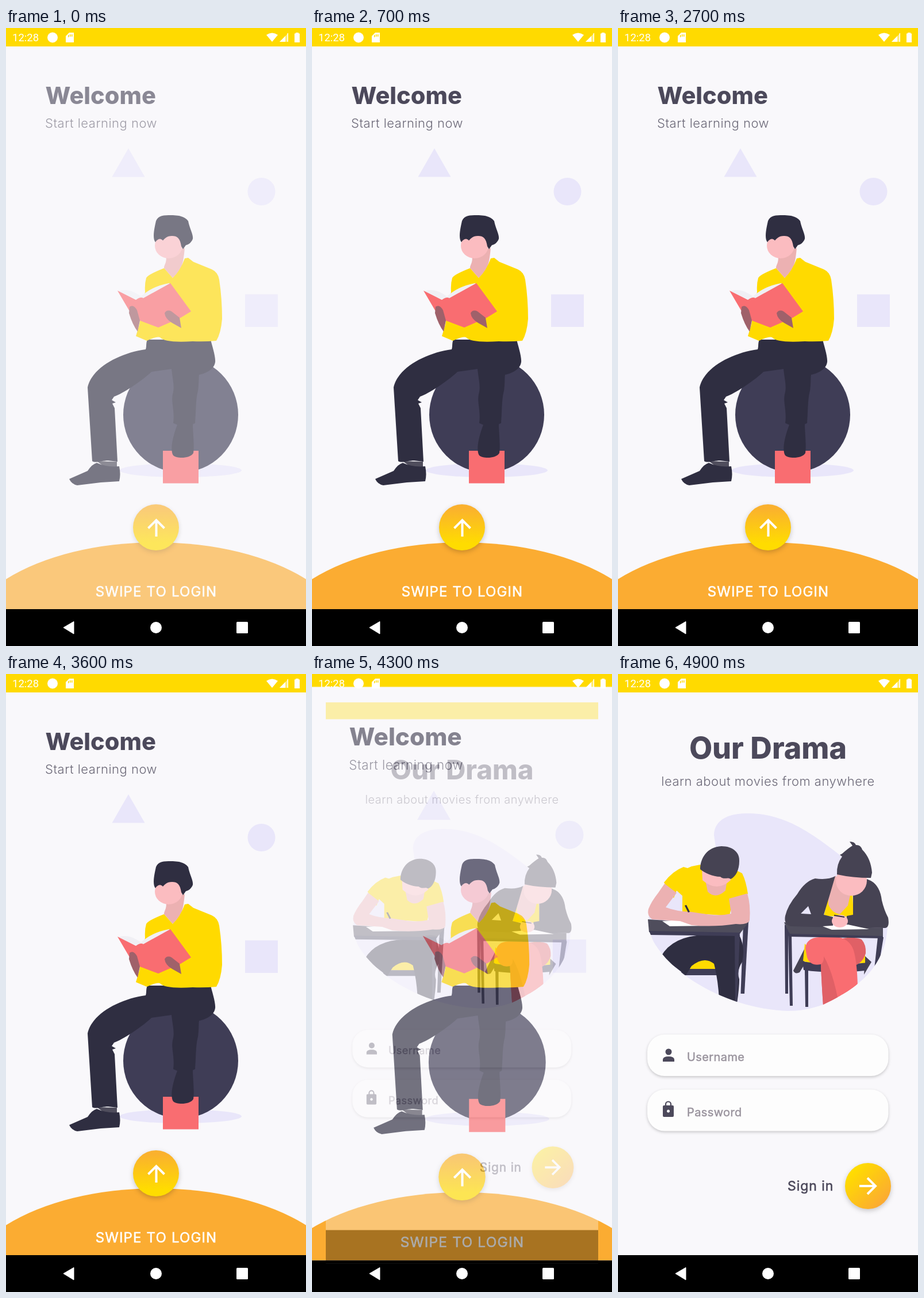
An HTML page that plays this animation: 522 by 1073 pixels, repeating every 5 s.

```html
<!DOCTYPE html>
<html lang="en">
<head>
<meta charset="utf-8">
<title>Welcome to login</title>
<style>
  html, body { margin: 0; width: 100%; height: 100%; overflow: hidden; background: #000; }
  svg { display: block; width: 522px; height: 1073px; font-family: Inter, "Open Sans", sans-serif; }

  .yellow { fill: #ffda00; }
  .lilac { fill: #e9e6fa; }
  .dark { fill: #2f2e41; }
  .navy { fill: #3f3d56; }
  .coat { fill: #464353; }
  .slate { fill: #4f4d5c; }
  .red { fill: #f96d71; }
  .deep { fill: #e06066; }
  .face { fill: #fbbcc0; }
  .skin { fill: #ecb1b2; }
  .brown { fill: #9f616a; }
  .white { fill: #fff; }
  .page { fill: #f9f8fb; }
  .arrow { fill: none; stroke: #fff; stroke-width: 4; }
  .raised { filter: drop-shadow(0 3px 4px #0003); }
  .card { fill: #fdfdfd; filter: drop-shadow(0 2px 2.5px #0003); }

  .ink { fill: #4c495b; }
  .h1 { font-weight: 800; font-size: 41.5px; }
  .h2 { font-weight: 800; font-size: 52px; }
  .sub { font-weight: 300; font-size: 22px; letter-spacing: .5px; fill: #6c6978; }
  .swipe { font-size: 24px; letter-spacing: 1.15px; stroke: #fff; stroke-width: .6px; }
  .hint { font-size: 20px; letter-spacing: .4px; fill: #9a949e; stroke: #9a949e; stroke-width: .5px; }
  .sign { font-size: 23px; letter-spacing: .95px; stroke: #4c495b; stroke-width: .6px; }
  .clock { font: 18.5px Roboto, sans-serif; }

  /* The screen updates ten times a second, so every pose is held. */
  .fade, .welcome, .login, .scrim { animation: 5s step-end infinite; transform-origin: 261px 536.5px; }
  .fade { animation-name: fade; }
  .welcome { animation-name: exit; }
  .login { animation-name: enter; }
  .scrim { animation-name: dim; }
  @keyframes fade {
    0% { opacity: .64; }
    2% { opacity: .88; }
    4%, 100% { opacity: 1; }
  }
  @keyframes exit {
    0% { transform: scale(1); }
    86% { transform: scale(1.019); }
    88% { transform: scale(1.045); }
    90%, 100% { transform: scale(1.05); }
  }
  @keyframes enter {
    0% { transform: scale(.85); opacity: 0; }
    86% { transform: scale(.908); opacity: .33; }
    88% { transform: scale(.985); opacity: 1; }
    90% { transform: scale(.9976); opacity: 1; }
    92%, 100% { transform: scale(1); opacity: 1; }
  }
  @keyframes dim {
    0% { opacity: 0; }
    88%, 100% { opacity: .25; }
  }
</style>
</head>
<body>
<svg viewBox="0 0 522 1073">
  <defs>
    <linearGradient id="up" x1="0" y1="0" x2="0" y2="1">
      <stop offset=".08" stop-color="#fab12e"/><stop offset=".85" stop-color="#ffdc00"/>
    </linearGradient>
    <linearGradient id="next" x1="0" y1="0" x2="1" y2="1">
      <stop offset=".18" stop-color="#ffdc00"/><stop offset=".88" stop-color="#fba835"/>
    </linearGradient>
    <path id="blob" d="M167 280C167 255 190 241 228 242C290 242 340 278 388 316C410 340 460 420 469 440C465 500 430 540 357 574C335 582 315 585 295 585C200 582 100 530 62 465C50 440 48 410 70 385C100 355 172 340 170 300Z"/>
    <clipPath id="inBlob"><use href="#blob"/></clipPath>
    <g id="window">
      <path class="page" d="M0 0h522v1073H0z"/>
      <path class="yellow" d="M0 0h522v32H0z"/>
      <path d="M0 1009h522v64H0z"/>
    </g>
  </defs>

  <g class="welcome">
    <use href="#window"/>
    <g class="fade">
      <text class="ink h1" x="68.500" y="132">Welcome</text>
      <text class="sub" x="68" y="173">Start learning now</text>

      <g class="lilac">
        <path d="M213 209L241.500 258.500H184.500Z"/>
        <circle cx="444.500" cy="284" r="24"/>
        <path d="M416 462.500h57v56.500h-57z"/>
        <ellipse cx="304" cy="768" rx="106" ry="12"/>
      </g>
      <circle class="navy" cx="304" cy="671.500" r="100"/>
      <path class="red" d="M273 734h62v56.500h-62z"/>
      <path class="slate" d="M158 752L193 753V764L170 761Z"/>
      <path class="dark" d="M246 541C243 548 245 553 243 558C198 564 149 590 142 624L150 752C156 756 166 751 178 751L194 753L189 660L185 652L191 650L184 646L188 640C205 634 240 610 253 597L288 592C290 612 294 622 290 636C287 650 294 665 291 686L298 689C288 715 286 735 291 742C297 748 320 748 326 738C328 724 325 700 325 688L329 686C331 660 330 645 334 630C336 616 335 605 336 602C346 600 362 594 364 580C365 570 358 550 356 541Z"/>
      <path class="dark" d="M110 783L142 769Q150 757 158 755Q175 763 197 761Q200 775 197 787L165 789L124 794Q114 792 110 783Z"/>
      <path class="skin" d="M278 392C281 408 275 410 275 417L290 434Q301 424 306 412Q309 404 311 382Z"/>
      <path class="yellow" d="M275 417Q247 428 244 434Q241 444 242 458L232 515L226 535L245 543Q262 535 268 537Q276 547 325 544Q345 545 366 543Q374 530 376 505Q376 470 371 437Q369 424 358 419L326 406L317 399L311 400Q303 422 290 434Z"/>
      <ellipse class="face" cx="283" cy="378" rx="24" ry="22"/>
      <path class="dark" d="M260 372C255 366 257 352 261 335C265 325 275 325 287 325C305 325 312 329 317 335C320 350 326 358 325 366C323 372 318 376 313 377L308 384L305 379C303 365 298 361 289 361C279 361 276 366 273 369C268 363 262 368 260 372Z"/>
      <path fill="#f0eff4" d="M195 457C210 452 222 457 235 466Q255 448 284 443L287 447L235 474L197 460Z"/>
      <path class="red" d="M194 456L226 472Q234 466 239 469L286 443L322 492L304 503L265 520L233 508L214 490Z"/>
      <path class="brown" d="M215 484Q222 479 228 490L233 508L229 527Q220 515 214 495Z"/>
      <path class="brown" d="M276 495Q280 488 288 492L302 503L305 521L289 512Q277 505 276 495Z"/>

      <path fill="#fbac32" d="M0 957A340 178 0 0 1 522 957V1009H0Z"/>
      <text class="white swipe" x="261.500" y="986.500" text-anchor="middle">SWIPE TO LOGIN</text>
      <circle class="raised" cx="261" cy="867" r="40" fill="url(#up)"/>
      <path class="arrow" d="M261.500 883V856M247.500 868.500L261.500 854.500L275.500 868.500"/>
    </g>
  </g>
  <path class="scrim" d="M0 0h522v1073H0z"/>

  <g class="login">
    <use href="#window"/>
    <text class="ink h2" x="261" y="147" text-anchor="middle">Our Drama</text>
    <text class="sub" x="261" y="194" text-anchor="middle">learn about movies from anywhere</text>
    <use class="lilac" href="#blob"/>

    <!-- legs and furniture -->
    <g clip-path="url(#inBlob)">
      <path class="navy" d="M218 434L227 431L220 555H213.500Z"/>
      <path class="yellow" d="M122 512Q145 488 172 498V513Z"/>
      <path class="navy" d="M110 512h64v11h-64z"/>
      <path class="dark" d="M75 490Q95 455 150 453H211Q222 475 216 500Q206 515 211 530Q211 545 207 572L176 565Q174 530 167 503Q150 489 128 507L118 523Z"/>
      <path class="navy" d="M203 452h9L207 572h-3Z"/>

      <path class="navy" d="M290 436h6v119h-5ZM296 450h6L304 576h-5ZM325 512h6v66h-5ZM452 457h10L450 530h-6Z"/>
      <path class="coat" d="M327 472Q318 490 305 515Q308 522 316 518L324 505ZM430 490L441 500L428 522Z"/>
      <path class="yellow" d="M325 468L322 498Q335 504 352 500ZM398 456h14v10h-14zM426 485h4v17h-14z"/>
      <path class="navy" d="M321 499Q375 508 436 501L430 515Q370 521 323 514Z"/>
      <path class="deep" d="M385 460Q410 455 424 461Q432 470 431 485Q425 504 408 507Z"/>
      <path class="deep" d="M398 485Q414 497 416 545L390 560Z"/>
      <path class="red" d="M326 476Q328 458 350 457L385 457Q404 462 410 480Q416 500 417 542L357 576Q354 530 353 504Q335 508 329 492Z"/>
      <path class="deep" d="M358 490Q373 515 383 566L357 576Q354 535 353 504Q359 500 358 490Z"/>
    </g>

    <!-- left student -->
    <path class="slate" d="M52 426L180 434L228 430L212 451L54 448Z"/>
    <path class="navy" d="M54 446L213 449L210 455L57 453Z"/>
    <path class="white" d="M77 429L110 427L162 437L90 438Z"/>
    <path class="yellow" d="M114 335L121 337L128 334L143 331L152 345Q180 365 208 342L216 346Q223 360 226 382L200 390L194 420L112 414V385L102 376L97 389L80 362Q95 342 114 335Z"/>
    <path class="skin" d="M81 364L102 380L83 405Q100 412 127 413L160 418Q180 420 197 416L193 390L225 381Q231 400 229 428Q225 436 205 434Q165 440 128 436L108 429L60 426Q50 420 53 408Q58 395 70 380Z"/>
    <path class="skin" d="M152 358H190L187 376Q170 392 156 378Z"/>
    <path class="face" d="M146 338H196V358Q172 380 147 358Z"/>
    <path class="coat" d="M143 339C143 320 155 300 180 299C200 299 212 310 211 325C211 340 205 352 196 356C190 352 185 358 178 352C165 352 150 345 143 339Z"/>
    <path class="dark" d="M116 402l3-1l6 12l-3 1z"/>

    <!-- right student -->
    <path class="slate" d="M289 431L372 437L461 441V458L300 455Z"/>
    <path class="navy" d="M289 433L299 451L461 455V459L297 456Z"/>
    <path class="yellow" d="M366 388L358 420L410 422L408 380Z"/>
    <path class="skin" d="M378 350L366 380V400Q372 415 386 417L400 402L405 380Z"/>
    <path class="coat" fill-rule="evenodd" d="M378 351Q365 358 343 355Q325 360 312 382Q295 402 291 420Q288 434 300 438L374 440V422L358 418L368 385ZM331 403L336 417L318 416Z"/>
    <path class="coat" d="M433 356L440 359Q456 368 459 393Q463 410 470 423Q473 440 465 441L398 440V420L409 418V384Q430 380 433 356Z"/>
    <ellipse class="face" cx="406" cy="359" rx="27" ry="26"/>
    <path class="coat" d="M390 312Q400 303 408 298L403 291Q412 291 414 297Q422 296 425 305Q440 320 442 345L440 354Q408 354 381 348Q380 330 390 317L386 314Z"/>
    <path class="white" d="M356 438L400 435L437 443L372 444Z"/>
    <ellipse class="face" cx="386" cy="429" rx="14" ry="11"/>
    <path class="dark" d="M376 418l18 3v2l-18-3z"/>

    <rect class="card" x="51" y="626" width="419.500" height="72" rx="30"/>
    <rect class="card" x="51" y="721.500" width="419.500" height="72" rx="30"/>
    <g class="ink">
      <circle cx="88" cy="656" r="5.500"/>
      <path d="M78 673V669Q79 664 88 664Q97 664 98 669V673Z"/>
      <path fill-rule="evenodd" d="M80 749H95Q97 749 97 751V767Q97 769 95 769H80Q78 769 78 767V751Q78 749 80 749ZM87.500 756.500a2.500 2.500 0 1 0 .1 0z"/>
    </g>
    <path d="M83 750V747a4.500 4.500 0 0 1 9 0V750" fill="none" stroke="#4c495b" stroke-width="2.200"/>
    <text class="hint" x="120" y="672">Username</text>
    <text class="hint" x="120" y="768">Password</text>
    <text class="ink sign" x="295" y="897">Sign in</text>
    <circle class="raised" cx="435" cy="889" r="40" fill="url(#next)"/>
    <path class="arrow" d="M420 889H447M434 875L448 889L434 903"/>
  </g>

  <!-- system icons -->
  <g class="white">
    <text class="clock" x="11" y="23">12:28</text>
    <circle cx="81" cy="16.500" r="9"/>
    <path fill-rule="evenodd" d="M110 8h8v17h-14V14ZM108 12v4h1.500v-4zM111 11v4h1.500v-4zM114 11v4h1.500v-4z"/>
    <path d="M453 12Q463 5 473 12L463 24Z"/>
    <path d="M491 9V24H476Z" opacity=".45"/>
    <path d="M486 14V24H476ZM489.500 9.500L491 8.500V24H489.500Z"/>
    <path d="M504 9.500V8h5V9.500H511V25H502V9.500Z"/>
  </g>
  <g class="white">
    <path d="M100 1041L118 1030.500V1052Z" stroke="#fff" stroke-linejoin="round"/>
    <circle cx="261" cy="1041" r="10"/>
    <rect x="401" y="1031" width="20" height="20" rx="1.500"/>
  </g>
</svg>
</body>
</html>
```
